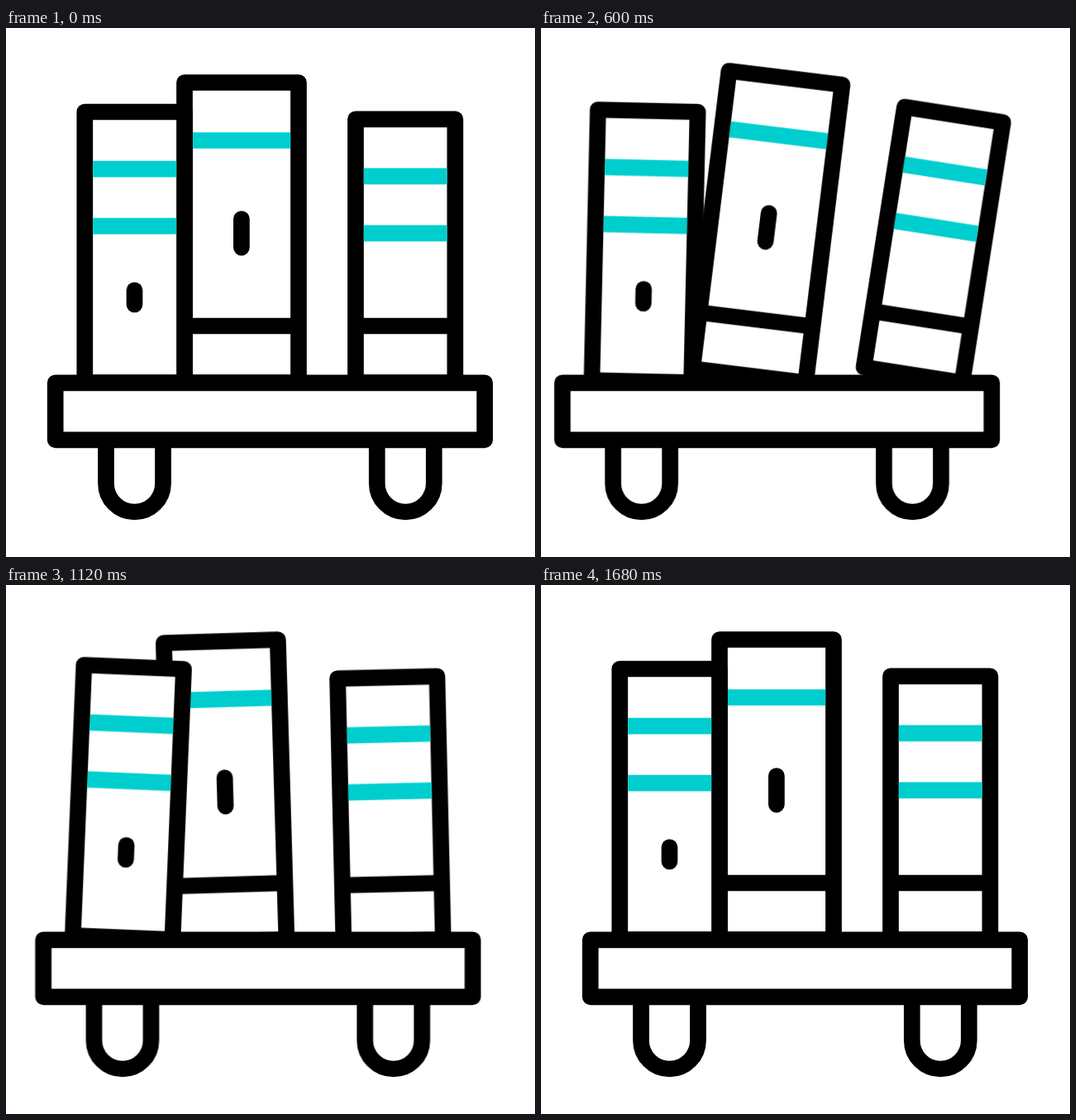
An HTML page for the animation above (2.08 s loop, 640x640 px).

```html
<!DOCTYPE html>
<html lang="en">
<head>
<meta charset="utf-8">
<title>Book cart</title>
<style>
  html, body { margin: 0; height: 100%; overflow: hidden; background: #fff; }
  svg { display: block; width: 100vw; height: 100vh; }

  .line, .box { fill: none; stroke: #000; stroke-width: 19.7; stroke-linejoin: round; }
  .box { fill: #fff; }
  .knob { stroke-linecap: round; }
  .stripe { fill: none; stroke: #00cece; stroke-width: 19.7; }

  .cart, .book { animation: 2080ms cubic-bezier(.75, 0, .25, 1) infinite; }
  .cart { animation-name: roll; }
  /* every book tips about its lower right corner */
  .left { transform-origin: 216px 429px; animation-name: tip-left; }
  .middle { transform-origin: 354px 429px; animation-name: tip-middle; }
  .right { transform-origin: 543.4px 429px; animation-name: tip-right; }

  @keyframes roll {
    0% { transform: translateX(0); }
    23.077% { transform: translateX(-40.4px); }
    42.55% { transform: translateX(36px); }
    58.25% { transform: translateX(-18.4px); }
    67.8%, 100% { transform: translateX(0); }
  }
  @keyframes tip-left {
    0% { transform: rotate(0deg); }
    23.077% { transform: rotate(1.8deg); }
    42.55% { transform: rotate(-3.95deg); }
    58.25% { transform: rotate(2.85deg); }
    73.1%, 100% { transform: rotate(0deg); }
  }
  @keyframes tip-middle {
    0%, 5.769% { transform: rotate(0deg); }
    19.231% { transform: rotate(8.5deg); }
    46.154%, 51.923% { transform: rotate(-1.75deg); }
    69.231% { transform: rotate(6.6deg); }
    80.769%, 100% { transform: rotate(0deg); }
  }
  @keyframes tip-right {
    0%, 5.769% { transform: rotate(0deg); }
    19.231% { transform: rotate(13.8deg); }
    43.27% { transform: rotate(-9.45deg); }
    63.22% { transform: rotate(3.6deg); }
    78.85%, 100% { transform: rotate(0deg); }
  }
</style>
</head>
<body>
<svg viewBox="0 0 640 640">
  <g class="cart">
    <g class="book middle">
      <path class="box" d="M216 66H354V429H216Z"/>
      <path class="stripe" d="M225.8 136H344.2"/>
      <path class="line" d="M216 360.5H354"/>
      <path class="line knob" d="M284.9 231V265.6"/>
    </g>
    <g class="book right">
      <path class="box" d="M423 110.3H543.4V429H423Z"/>
      <path class="stripe" d="M432.8 179.4H533.6M432.8 248.3H533.6"/>
      <path class="line" d="M423 360.5H543.4"/>
    </g>
    <g class="book left">
      <path class="box" d="M95.3 101.5H216V429H95.3Z"/>
      <path class="stripe" d="M105.1 170.7H206.2M105.1 239.6H206.2"/>
      <path class="line knob" d="M155.5 317.3V334.5"/>
    </g>
    <path class="line" d="M121 498V551a34.5 34.5 0 0 0 69 0V498M448.8 498V551a34.5 34.5 0 0 0 69 0V498"/>
    <path class="box" d="M59.7 429.3H579.2V498.3H59.7Z"/>
  </g>
</svg>
</body>
</html>
```
